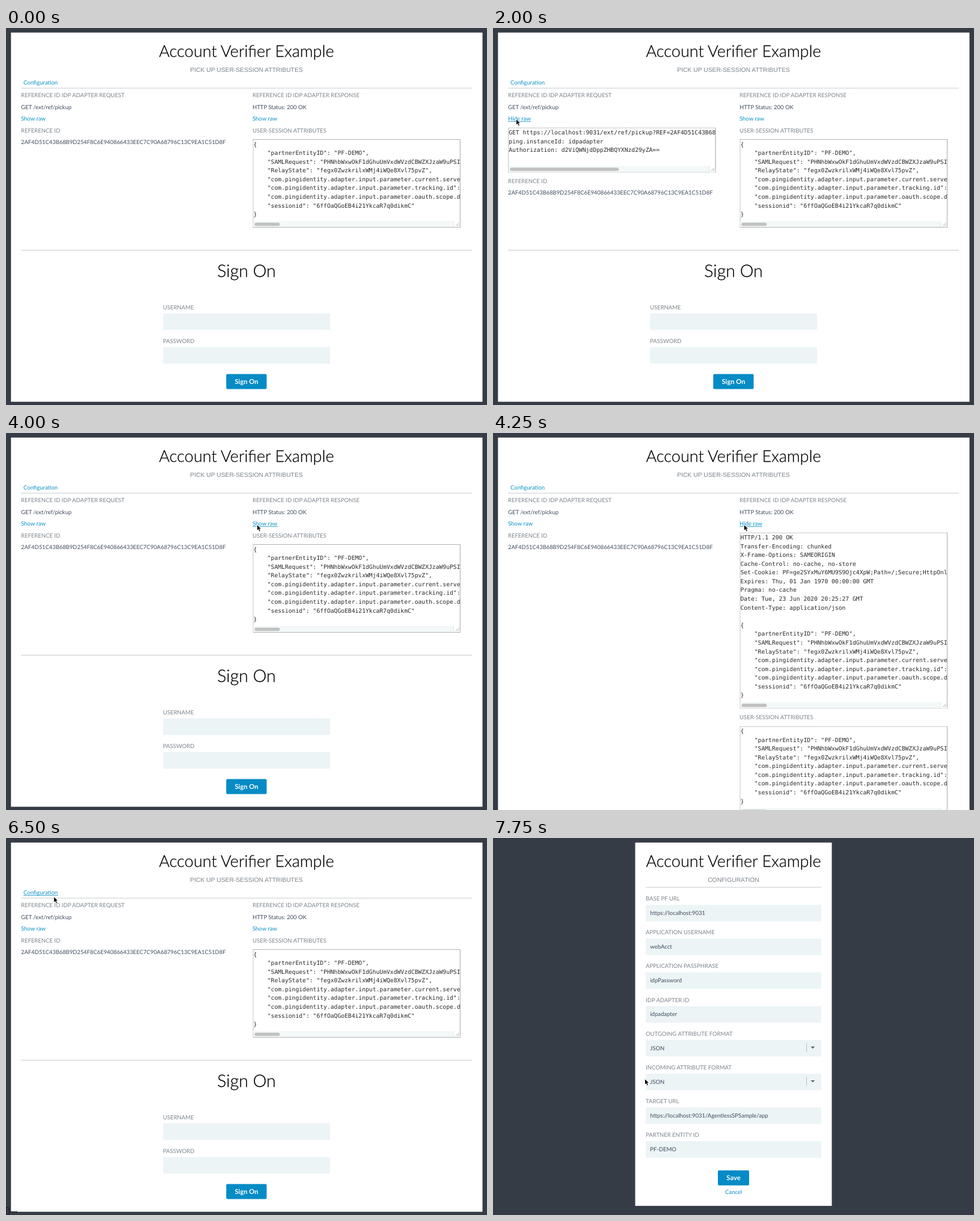
An HTML page for the animation above (8 s loop, 800 by 627 pixels).

```html
<!DOCTYPE html>
<html lang="en">
<head>
<meta charset="utf-8">
<title>Sign-on sample</title>
<style>
html, body { margin: 0; width: 100%; height: 100%; overflow: hidden; background: #363c45; }
svg { display: block; }
text { font: 9.5px Lato, sans-serif; fill: #3f4b5d; text-rendering: geometricPrecision; white-space: pre; }
.title { font-size: 27px; font-weight: 300; fill: #000; stroke: #000; stroke-width: .25px; text-anchor: middle; }
.big { font-size: 28.6px; }
.sub { font: 10.3px "Liberation Sans", Arial, sans-serif; fill: #7d858c; text-anchor: middle; }
.label { fill: #7d858c; }
.link { fill: #0a8fc6; }
.hash { font-size: 9.38px; }
.mid { text-anchor: middle; }
.btn { font-size: 11.2px; font-weight: 700; fill: #fff; text-anchor: middle; }
.code { font: 9.7px "DejaVu Sans Mono", monospace; fill: #2a2a2a; }
</style>
</head>
<body>
<svg id="stage" width="800" height="627" viewBox="0 0 800 627"></svg>
<script>
const LOOP = 8000;
const stage = document.getElementById('stage');

// time, x, y of the pointer tip
const pointer = [
  [500, 187, 35], [750, 88, 83], [1000, 40, 139], [1250, 38, 151],
  [3250, 96, 151], [3500, 309, 151], [3750, 394, 151], [4000, 417, 152],
  [5500, 401, 152], [5750, 198, 124], [6000, 101, 105], [6250, 79, 97],
  [7500, 161, 266], [7750, 252, 400]
];

const json = `{
    "partnerEntityID": "PF-DEMO",
    "SAMLRequest": "PHNhbWxwOkF1dGhuUmVxdWVzdCBWZXJzaW9uPSI
    "RelayState": "fegx0ZwzkrilxWMj4iWQe8Xvl75pvZ",
    "com.pingidentity.adapter.input.parameter.current.server
    "com.pingidentity.adapter.input.parameter.tracking.id":
    "com.pingidentity.adapter.input.parameter.oauth.scope.de
    "sessionid": "6ffOaQGoEB4i21YkcaR7q0dikmC"
}`;
const refId = '2AF4D51C43B68B9D254F8C6E940866433EEC7C90A68796C13C9EA1C51D8F';
const request = `GET https://localhost:9031/ext/ref/pickup?REF=${refId}
ping.instanceId: idpadapter
Authorization: d2ViQWNjdDppZHBQYXNzd29yZA==`;
const response = `HTTP/1.1 200 OK
Transfer-Encoding: chunked
X-Frame-Options: SAMEORIGIN
Cache-Control: no-cache, no-store
Set-Cookie: PF=ge2SYxMuY6MU9S9Ojc4XpW;Path=/;Secure;HttpOnly
Expires: Thu, 01 Jan 1970 00:00:00 GMT
Pragma: no-cache
Date: Tue, 23 Jun 2020 20:25:27 GMT
Content-Type: application/json

${json}`;

const rect = (x, y, w, h, fill, more = '') =>
  `<rect x="${x}" y="${y}" width="${w}" height="${h}" fill="${fill}" ${more}/>`;
const text = (x, y, s, cls = '') => `<text x="${x}" y="${y}" class="${cls}">${s}</text>`;
const label = (x, y, s) => text(x, y, s, 'label');
const field = (x, y, w) => rect(x, y, w, 27.5, '#ecf4f6', 'rx="1"');
const rule = (x, y, w) => rect(x, y, w, 1, '#c6cacc');
const shift = (dy, s) => `<g transform="translate(0 ${dy})">${s}</g>`;
const button = (x, y, w, s) =>
  rect(x, y, w, 25, '#058bc5', 'rx="2"') + text(400, y + 16.5, s, 'btn');

function link(x, y, s, w, hover) {
  return text(x, y, s, 'link') + (hover ? rect(x, y + 1, w, 0.8, '#0a8fc6') : '');
}

function area(x, y, h, body, thumb) {
  const w = 345.5;
  const lines = body.split('\n').map((s, i) => text(1, 11.5 + i * 14.58, s, 'code')).join('');
  return `<svg x="${x}" y="${y}" width="${w}" height="${h}">` +
    rect(0.5, 0.5, w - 1, h - 1, '#fff', 'stroke="#b4b4b4"') + lines +
    rect(1, h - 11, w - 2, 10, '#f3f8f9') +
    rect(3, h - 8.3, thumb, 5.5, '#c1c1c1', 'rx="2.7"') +
    rect(w - 11, h - 11, 10, 10, '#fff') +
    rect(w - 11.5, h - 11, 0.7, 10, '#ddd') +
    `<path d="M${w - 8} ${h - 2.5}l6-6M${w - 5} ${h - 2.5}l3-3" stroke="#999" stroke-width=".8"/>` +
    rect(w - 1, 0, 1, h, '#b4b4b4') + '</svg>';
}

function pickupPage(s) {
  const left = s.request ? 84 : 0, right = s.response ? 302.5 : 0;
  const raw = (x, open, hover) =>
    link(x, 154.3, open ? 'Hide raw' : 'Show raw', open ? 38 : 42, hover);
  return rect(8.3, 7.6, 784.2, 614 + right, '#fff') +
    text(400, 47.5, 'Account Verifier Example', 'title') +
    text(400, 73, 'PICK UP USER-SESSION ATTRIBUTES', 'sub') +
    link(29, 94.3, 'Configuration', 57.5, s.hover === 'config') +
    rule(25, 99.5, 750) +
    label(25, 115.3, 'REFERENCE ID IDP ADAPTER REQUEST') +
    text(25, 134.8, 'GET /ext/ref/pickup') +
    raw(25, s.request, s.hover === 'request') +
    (s.request ? area(25.2, 165.5, 75, request, 181) : '') +
    shift(left, label(25, 173.6, 'REFERENCE ID') + text(25, 193, refId, 'hash')) +
    label(410, 115.3, 'REFERENCE ID IDP ADAPTER RESPONSE') +
    text(410, 134.8, 'HTTP Status: 200 OK') +
    raw(410, s.response, s.hover === 'response') +
    (s.response ? area(410.4, 165.5, 293, response, 42) : '') +
    shift(right,
      label(410, 173.6, 'USER-SESSION ATTRIBUTES') +
      area(410.4, 185, 147, json, 42) +
      rule(25, 369, 750) +
      text(400, 413.8, 'Sign On', 'title big') +
      label(261, 467.6, 'USERNAME') + field(261.3, 474.5, 277.7) +
      label(261, 523.8, 'PASSWORD') + field(261.3, 530.7, 277.7) +
      button(366.3, 575.6, 67.2, 'Sign On'));
}

const settings = [
  ['BASE PF URL', 'https://localhost:9031'],
  ['APPLICATION USERNAME', 'webAcct'],
  ['APPLICATION PASSPHRASE', 'idpPassword'],
  ['IDP ADAPTER ID', 'idpadapter'],
  ['OUTGOING ATTRIBUTE FORMAT', 'JSON', true],
  ['INCOMING ATTRIBUTE FORMAT', 'JSON', true],
  ['TARGET URL', 'https://localhost:9031/AgentlessSPSample/app'],
  ['PARTNER ENTITY ID', 'PF-DEMO']
];

function configPage() {
  const rows = settings.map(([name, value, select], i) => shift(i * 56.15,
    label(254, 104.2, name) + field(254, 111.2, 292) + text(261.3, 128, value) +
    (select ? rect(521, 116.5, 0.8, 14.5, '#a9b3b9') +
      '<path d="M528.3 122.2h7l-3.5 3.6z" fill="#5c6670"/>' : '')));
  return rect(236.5, 7.6, 327, 604.2, '#fff') +
    text(400, 47.5, 'Account Verifier Example', 'title') +
    text(400, 73, 'CONFIGURATION', 'sub') +
    rule(254, 81.5, 292) + rows.join('') +
    button(374, 552.7, 52, 'Save') +
    text(400, 592.3, 'Cancel', 'link mid');
}

const cursor = ([, x, y]) => `<path transform="translate(${x} ${y})"
  d="M.5.5v10l2.3-2.2 1.6 3.6 1.9-.8-1.6-3.5h3z" fill="#000" stroke="#fff" stroke-width=".8"/>`;

// corner of the browser's status bubble while it slides away
const bubble = wide => `<path d="M0 614.5h3.5q2 0 2 2V627H0z" fill="#343942" stroke="#16191d"/>` +
  (wide ? rect(6, 621, 13, 1, '#1d2126') : '');

function draw(t) {
  const within = (a, b) => t >= a && t < b;
  const state = {
    request: within(2000, 3250),
    response: within(4250, 5500),
    hover: within(1500, 3500) ? 'request' : within(4000, 5500) ? 'response' :
      within(6250, 6750) ? 'config' : ''
  };
  const tip = pointer.filter(p => p[0] <= t).pop();
  return (t < 6750 ? pickupPage(state) : configPage()) +
    (within(6500, 7000) ? bubble(t < 6750) : '') +
    (tip ? cursor(tip) : '');
}

let last = -1;
function tick() {
  const step = Math.floor(performance.now() % LOOP / 250);
  if (step !== last) stage.innerHTML = draw(step * 250);
  last = step;
  requestAnimationFrame(tick);
}
tick();
</script>
</body>
</html>
```
